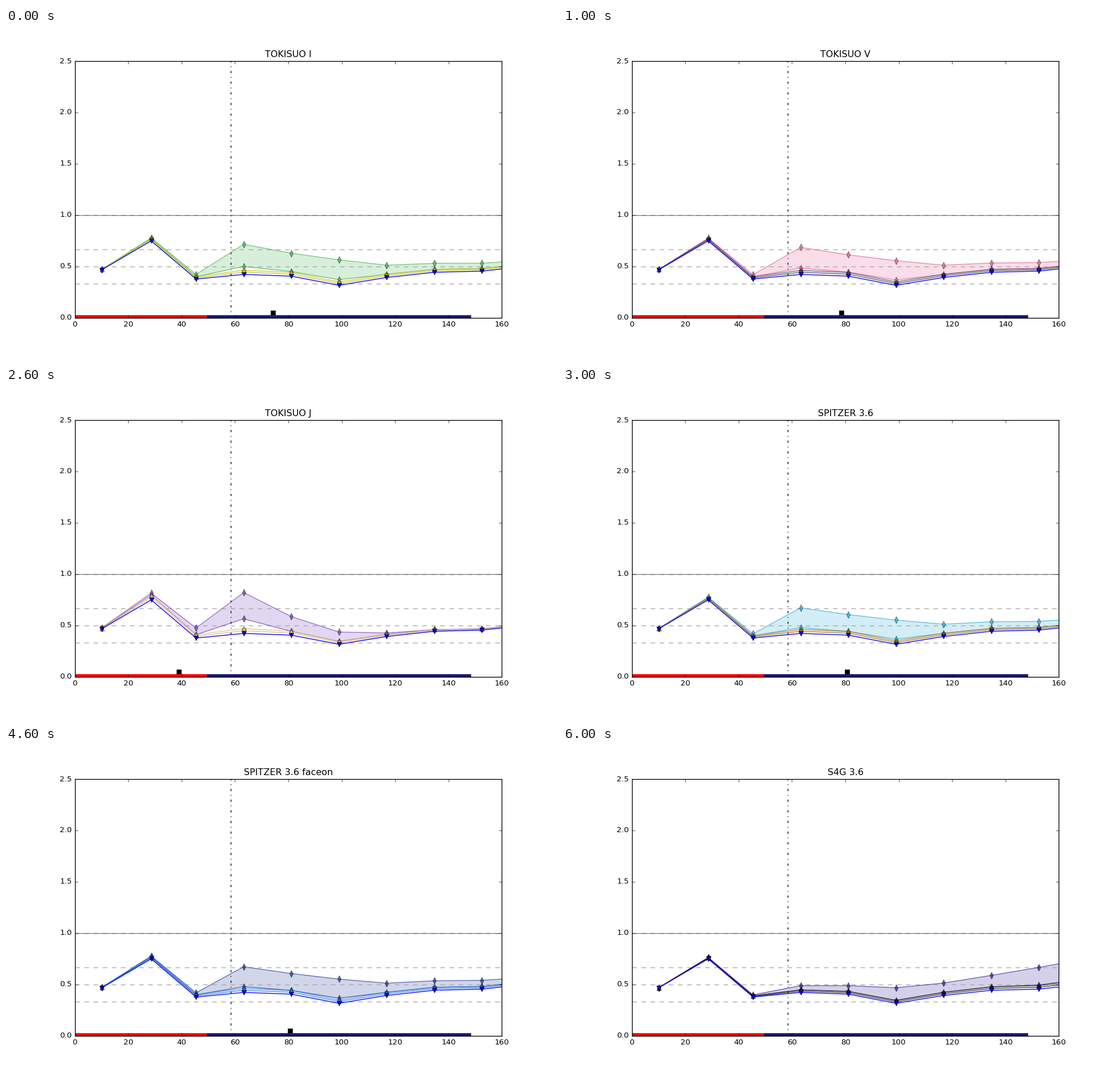
These frames come from a looping animation (966 by 580 pixels, 7000 ms). A matplotlib script:

```python
import numpy as np
import matplotlib.pyplot as plt
from matplotlib.animation import FuncAnimation

plt.style.use("classic")
plt.rcParams.update({"font.family": "DejaVu Sans", "font.size": 10,
                     "savefig.dpi": "figure"})

DPI = 96
fig = plt.figure(figsize=(966 / DPI, 580 / DPI), dpi=DPI, facecolor="white")
ax = fig.add_axes([0.125, 0.125, 0.775, 0.775])

TURNOVER = 58.5   # radius of the dash-dotted line
PIVOT = 116.5     # radius where the wide discs agree

# Evenly spaced rings, the two innermost set apart
RADIUS = np.concatenate([[10, 28.6], 45.4 + 17.85 * np.arange(8)])
INSIDE = RADIUS < TURNOVER

# Key points: lowest curve, and the rise of the flattest disc above it
FLOOR = np.array([.465, .748, .376, .421, .404, .315, .391, .442, .453, .504])
RISE = np.array([.002, .014, .021, .066, .083, .152, .121, .145, .212, .245])

# title, outer colour, inner colour, steepness, gain, scale length mark
SCENES = [
    ("TOKISUO I", (59, 176, 74), (198, 190, 20), 0.028, 1, 74.3),
    ("TOKISUO V", (225, 85, 140), (65, 60, 85), 0.026, 1, 78.4),
    ("TOKISUO J", (110, 55, 180), (222, 184, 125), 0.057, 0.29, 39.0),
    ("SPITZER 3.6", (35, 165, 210), (165, 100, 10), 0.025, 1, 80.7),
    ("SPITZER 3.6 faceon", (25, 45, 145), (30, 120, 225), 0.025, 1, 80.7),
    ("GALFIT K", (40, 55, 185), (150, 10, 45), 0.0055, 1, 145.9),
    ("S4G 3.6", (45, 20, 145), (25, 25, 20), 0, 1, None),
]


def excess(steep, gain):
    """Heights of the outer top, outer bottom and inner top above the floor."""
    lift = RISE * np.where(INSIDE, np.exp(27 * steep),
                           gain * np.exp(steep * (PIVOT - RADIUS)))
    tilt = 0.35 * steep - 0.004
    near = 0.031 * gain ** 0.3 * np.exp(tilt * (PIVOT - RADIUS))
    near = np.where(INSIDE, np.minimum(0.7 * lift, 0.5 * near), near)
    return np.maximum(lift, near), np.maximum(0.9 * lift ** 2, near), near


def curve(y, color, marker, alpha=1.0):
    return ax.plot(RADIUS, y, marker=marker, color=color, mec="k", ms=6,
                   lw=1, alpha=alpha)[0]


def band(low, high, rgb, low_marker, high_marker):
    color = tuple(c / 255 for c in rgb)
    fill = ax.fill_between(RADIUS, FLOOR + low, FLOOR + high, color=color,
                           alpha=0.2, lw=0)
    return [fill, curve(FLOOR + low, color, low_marker, 0.7),
            curve(FLOOR + high, color, high_marker, 0.7)]


def build(outer, inner, steep, gain, mark):
    top, bottom, near = excess(steep, gain)
    parts = band(bottom, top, outer, "d", "d")
    parts += band(near / 2, near, inner, "v", "^")
    parts.append(curve(FLOOR, "blue", "v"))
    if mark is not None:
        parts += ax.plot([mark], [0.05], "ks", ms=6)
    return parts


# Reference lines
for level in (1 / 3, 0.5, 2 / 3, 1):
    ax.axhline(level, color="0.65", ls="--", lw=1)
ax.axhline(1, color="0.3", lw=1, alpha=0.7)
ax.axvline(TURNOVER, color="k", ls="-.", lw=1)

groups = [build(*scene[1:]) for scene in SCENES]

# Radial extent bars along the bottom
for start, end, color in ((0, 49.2, "red"), (49.2, 148.4, "midnightblue")):
    ax.plot([start, end], [0, 0], color=color, lw=8, solid_capstyle="butt")

ax.set(xlim=(0, 160), ylim=(0, 2.5))
title = ax.set_title("")


def update(i):
    for k, parts in enumerate(groups):
        for part in parts:
            part.set_visible(k == i)
    title.set_text(SCENES[i][0])
    return [title, *groups[i]]


update(0)
anim = FuncAnimation(fig, update, frames=len(SCENES), interval=1000,
                     repeat=True, repeat_delay=0, blit=False)
plt.show()
```
